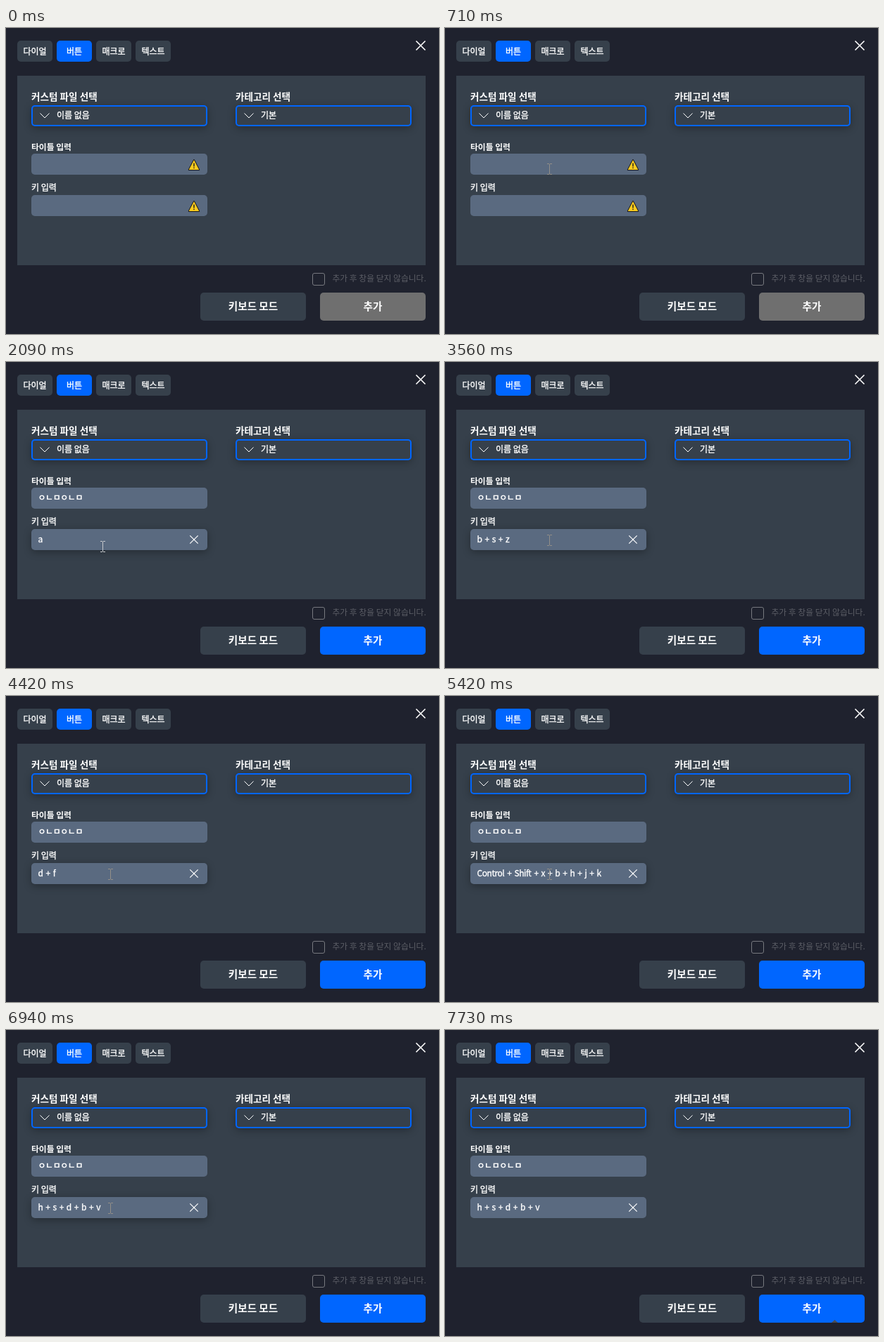
An HTML page with a canvas that plays this animation: 615x436 px, repeating every 8.06 s.

```html
<!DOCTYPE html>
<html lang="ko">
<head>
<meta charset="utf-8">
<title>Key input dialog</title>
<style>
html, body { margin: 0; width: 100%; height: 100%; overflow: hidden; background: #1f222e; }
canvas { display: block; width: 615px; height: 436px; }
</style>
</head>
<body>
<canvas id="stage"></canvas>
<script>
const W = 615, H = 436, LOOP = 8060;
const FONT = '"Noto Sans CJK KR", "Noto Sans CJK", "Noto Sans CJK JP", sans-serif';
const BG = '#1f222e', PANEL = '#36404b', BLUE = '#0066ff', FIELD = '#5a6a80', GRAY = '#6f6f6f';
const canvas = document.getElementById('stage');
const ctx = canvas.getContext('2d');
const dpr = window.devicePixelRatio || 1;
canvas.width = Math.round(W * dpr);
canvas.height = Math.round(H * dpr);

// [time, text] changes for each input
const titleLog = [[1230, 'ㅇㄴ'], [1360, 'ㅇㄴㅁ'], [1500, 'ㅇㄴㅁㅇㄴ'], [1570, 'ㅇㄴㅁㅇㄴㅁ']];
const keyLog = [];
const press = (time, ...keys) => keyLog.push([time, keys.join(' + ')]);
function mash(start, step, letters) {
  for (let i = 0; i < letters.length; i++) press(start + i * step, ...letters.slice(0, i + 1));
}
mash(2090, 140, 'as');
press(2430, 'a', 's', 'd');
press(2630, 'a', 'd');
press(2710, 'a', 'd', 'f');
press(2890, 'a', 's', 'd', 'f', 'g');
press(3030, 'a', 'f');
mash(3170, 65, 'fghj');
mash(3425, 66, 'bszxcvdg');
mash(3960, 67, 'asdfg');
mash(4300, 65, 'dfghj');
mash(4625, 65, 'sx');
press(4890, 'Control');
press(4950, 'Control', 'Shift');
press(5150, 'Control', 'Shift', 'x');
press(5240, 'Control', 'Shift', 'x', 'b');
press(5330, 'Control', 'Shift', 'x', 'b', 'h');
press(5420, 'Control', 'Shift', 'x', 'b', 'h', 'j', 'k');
mash(6010, 66, 'jkdfs');
mash(6340, 66, 'gadb');
press(6600, 'c');
mash(6660, 70, 'hsdbv');

// pointer path: time, x, y
const path = [
  [180, 450, 388], [400, 300, 300], [640, 148, 201], [1640, 148, 201],
  [1900, 137, 263], [2630, 137, 263], [2890, 148, 254], [7260, 148, 254],
  [7530, 500, 360], [7630, 568, 398], [7730, 562, 440]
];

function latest(log, t) {
  let text = '';
  for (const [time, value] of log) if (t >= time) text = value;
  return text;
}

function pointerAt(t) {
  for (let i = 1; i < path.length; i++) {
    const [t0, x0, y0] = path[i - 1], [t1, x1, y1] = path[i];
    if (t < t1) {
      const k = Math.floor((t - t0) / 65) * 65 / (t1 - t0);
      return [Math.round(x0 + (x1 - x0) * k), Math.round(y0 + (y1 - y0) * k)];
    }
  }
}

// weight 500 is a regular face thickened by a thin outline
function text(str, x, y, size, weight, { align = 'left', color = '#fff', gap = 0, word = 0 } = {}) {
  const medium = weight === 500;
  ctx.font = `${medium ? 400 : weight} ${size}px ${FONT}`;
  ctx.textAlign = align;
  ctx.letterSpacing = gap + 'px';
  ctx.wordSpacing = word + 'px';
  ctx.fillStyle = color;
  ctx.fillText(str, x, y);
  if (medium) {
    ctx.strokeStyle = color;
    ctx.lineWidth = 0.35;
    ctx.strokeText(str, x, y);
  }
}

function box(x, y, w, h, color, r = 5, shadow = false) {
  ctx.save();
  if (shadow) {
    ctx.shadowColor = 'rgba(0,0,0,.3)';
    ctx.shadowBlur = 12 * dpr;
    ctx.shadowOffsetY = 3 * dpr;
  }
  ctx.fillStyle = color;
  ctx.beginPath();
  ctx.roundRect(x, y, w, h, r);
  ctx.fill();
  ctx.restore();
}

function line(points, color, width, close = false) {
  ctx.beginPath();
  points.forEach(([x, y]) => ctx.lineTo(x, y));
  if (close) ctx.closePath();
  ctx.strokeStyle = color;
  ctx.lineWidth = width;
  ctx.stroke();
}

function cross(x, y, r, width) {
  line([[x - r, y - r], [x + r, y + r]], '#fff', width);
  line([[x - r, y + r], [x + r, y - r]], '#fff', width);
}

function warning(x, y) {
  ctx.lineJoin = 'round';
  line([[x, y - 7], [x + 7.3, y + 7], [x - 7.3, y + 7]], '#17181c', 1.8, true);
  ctx.fillStyle = '#fccb1e';
  ctx.fill();
  ctx.lineJoin = 'miter';
  ctx.fillStyle = '#17181c';
  ctx.fillRect(x - 0.7, y - 2.5, 1.4, 5);
  ctx.fillRect(x - 0.7, y + 3.6, 1.4, 1.5);
}

function dropdown(x, label, value) {
  text(label, x, 103, 13.6, 700);
  box(x, 110, 250, 30, BLUE, 5, true);
  box(x + 2, 112, 246, 26, PANEL, 3);
  line([[x + 12.5, 121.5], [x + 19, 128], [x + 25.5, 121.5]], '#fff', 1);
  text(value, x + 36, 129, 12, 500);
}

function beam(x, y, color) {
  ctx.fillStyle = color;
  ctx.fillRect(x, y - 7, 1, 14);
  for (const edge of [y - 8, y + 7]) {
    ctx.fillRect(x - 3, edge, 3, 1);
    ctx.fillRect(x + 1, edge, 3, 1);
  }
}

function arrow(x, y) {
  line([[x, y], [x, y + 15], [x + 3.5, y + 12], [x + 6, y + 17], [x + 8, y + 16],
    [x + 6, y + 11], [x + 10.5, y + 11]], '#000', 1, true);
  ctx.fillStyle = '#fff';
  ctx.fill();
}

function pointer(t) {
  if (t < 180 || t >= 7730) return;
  const [x, y] = pointerAt(t);
  const inField = x > 36 && x < 286 && ((y >= 179 && y < 209) || (y >= 238 && y < 268));
  if (inField) beam(x, y, y > 258 ? '#c6c9cd' : '#938f88');
  else arrow(x, y);
}

function draw(t) {
  ctx.setTransform(dpr, 0, 0, dpr, 0, 0);
  ctx.fillStyle = BG;
  ctx.fillRect(0, 0, W, H);

  ['다이얼', '버튼', '매크로', '텍스트'].forEach((name, i) => {
    box(16 + i * 56, 18, 50, 30, i === 1 ? BLUE : PANEL);
    text(name, 41 + i * 56, 38, 12, 500, { align: 'center' });
  });
  cross(589, 25, 6.5, 1.6);

  box(16, 68, 580, 270, PANEL, 0);
  dropdown(36, '커스텀 파일 선택', '이름 없음');
  dropdown(326, '카테고리 선택', '기본');

  const typed = { gap: -0.45, word: 1.75 };
  text('타이틀 입력', 36, 174, 11.8, 700);
  box(36, 179, 250, 30, FIELD);
  text(latest(titleLog, t), 45.5, 198, 12, 700, typed);
  if (t < 1950) warning(267, 195);
  if (t >= 830 && t < 970) {
    ctx.fillStyle = '#fff';
    ctx.fillRect(46, 187, 1, 14);
  }

  const keys = latest(keyLog, t);
  text('키 입력', 36, 232, 12, 500);
  box(36, 238, 250, 30, FIELD, 5, t >= 1950 && t < 7400);
  text(keys, 45.5, 257, 12, 500, typed);
  if (keys) cross(267, 253, 5.7, 1.2);
  else warning(267, 254);

  ctx.beginPath();
  ctx.roundRect(435.5, 349.5, 17, 17, 2.5);
  ctx.strokeStyle = '#77797f';
  ctx.lineWidth = 1;
  ctx.stroke();
  text('추가 후 창을 닫지 않습니다.', 463.5, 361, 11.8, 400, { color: '#5c5e66' });

  box(276, 377, 150, 40, PANEL);
  text('키보드 모드', 351, 402, 14.6, 700, { align: 'center' });
  box(446, 377, 150, 40, keys ? BLUE : GRAY);
  text('추가', 521, 402, 14.6, 700, { align: 'center' });

  pointer(t);
  if (t >= 7730) {
    ctx.fillStyle = '#4a4d55';
    ctx.beginPath();
    ctx.moveTo(549, 417);
    ctx.lineTo(553.5, 413);
    ctx.lineTo(558, 417);
    ctx.fill();
  }
}

const start = performance.now();
function tick(now) {
  draw(Math.max(0, now - start) % LOOP);
  requestAnimationFrame(tick);
}
draw(0);
requestAnimationFrame(tick);
</script>
</body>
</html>
```
